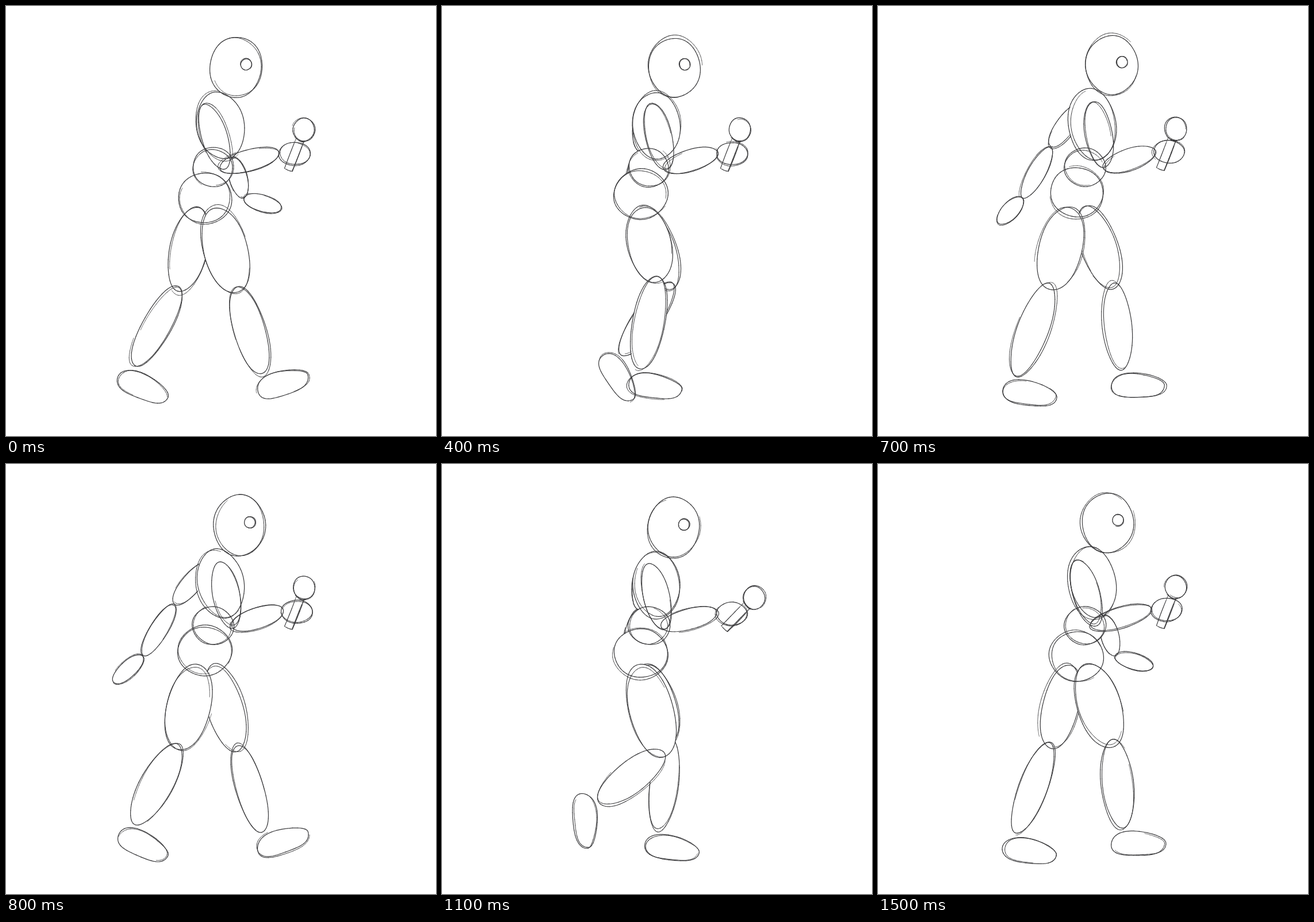
Recreate the animation shown at these times as an HTML page with a canvas. Size 748 px wide and 748 px high, loop 1600 ms.

```html
<!DOCTYPE html>
<html lang="en">
<head>
<meta charset="utf-8">
<title>Walk cycle sketch</title>
<style>
  html, body { margin: 0; width: 100%; height: 100%; overflow: hidden; background: #fff; }
  canvas { display: block; width: 748px; height: 748px; }
</style>
</head>
<body>
<canvas id="stage" width="748" height="748"></canvas>
<script>
const ctx = document.getElementById('stage').getContext('2d');
const STEP = 100, STEPS = 16, TAU = Math.PI * 2;

// One stride, evenly spaced from heel contact. The far leg runs half a stride later.
const KNEE = [[402, 497], [411, 494], [374, 478], [314, 490], [301, 495], [366, 522], [400, 490], [415, 480]];
const ANKLE = [[446, 640], [403, 645], [345, 632], [268, 651], [223, 627], [240, 580], [313, 607], [388, 625]];
const FOOT_TILT = [-20, 6, 5, 2, 22, 98, 55, 25];
const ARM_SWING = [0.95, 0.5, 0, -0.55, -1, -0.3, 0.2, 0.8];

// Smooth closed path through evenly spaced values.
function along(keys, step) {
  const n = keys.length, f = step / STEPS * n, i = Math.floor(f), u = f - i;
  const [a, b, c, d] = [-1, 0, 1, 2].map(k => keys[(i + k + n) % n]);
  return b + u / 2 * (c - a + u * (2 * a - 5 * b + 4 * c - d + u * (3 * (b - c) + d - a)));
}
const pathAt = (keys, step) => [0, 1].map(c => along(keys.map(k => k[c]), step));

function random(seed) {
  let s = Math.imul(seed, 2654435761);
  return () => {
    s = (s + 0x6D2B79F5) | 0;
    let t = Math.imul(s ^ (s >>> 15), s | 1);
    t ^= t + Math.imul(t ^ (t >>> 7), t | 61);
    return ((t ^ (t >>> 14)) >>> 0) / 4294967296;
  };
}

// A shape is a centre, a size and a function from turns to a point.
function oval(cx, cy, long, wide, angle = 0, profile = () => 1) {
  const c = Math.cos(angle), s = Math.sin(angle);
  const at = turn => {
    const x = Math.cos(turn * TAU), y = Math.sin(turn * TAU);
    const px = x * long / 2, py = y * wide / 2 * profile(x, y);
    return [cx + px * c - py * s, cy + px * s + py * c];
  };
  return { at, cx, cy, size: Math.min(long, wide) };
}

const limb = ([x1, y1], [x2, y2], wide) =>
  oval((x1 + x2) / 2, (y1 + y2) / 2, Math.hypot(x2 - x1, y2 - y1), wide, Math.atan2(y2 - y1, x2 - x1));

// Flat sole, and an upper that slopes down to the toe.
function footAt([x, y], degrees) {
  const a = degrees * Math.PI / 180, c = Math.cos(a), s = Math.sin(a);
  const profile = (px, py) => py < 0 ? 1.05 - 0.3 * px : 0.95 + 0.3 * px * px;
  return oval(x + 28 * (c - s), y + 28 * (c + s), 94, 42, a, profile);
}

function legAt(step, far) {
  const phase = (step + far * STEPS / 2) % STEPS;
  const hip = [348 + 14 * Math.cos(phase / STEPS * TAU), 349];
  const [kx, ky] = pathAt(KNEE, phase), ankle = pathAt(ANKLE, phase);
  return {
    thigh: limb(hip, [kx, ky + 3], far ? 64 : 76),
    shin: limb([kx, ky - 8], ankle, far ? 49 : 56),
    foot: footAt(ankle, along(FOOT_TILT, phase))
  };
}

function poseAt(step) {
  const bob = Math.sin(step / STEPS * TAU * 2);
  const sway = -Math.cos((step + 1) / STEPS * TAU);
  const lean = 12 + 9 * Math.cos(step / STEPS * TAU * 2);
  const near = legAt(step, 0), far = legAt(step, 1);

  const headX = 403 + 3.5 * sway, headY = 106.5 + 5.5 * bob;
  const wrist = [479 + 4 * sway, 254 + 4 * bob];

  const swing = along(ARM_SWING, step);
  const farElbow = [345 + 52 * swing, 254 + 10 * swing];
  const farWrist = [328 + 90 * swing, 334];

  // The microphone tips forward once per loop.
  const tilt = 0.37 + 0.4 * Math.exp(-(((step - 11) / 1.5) ** 2));
  const base = [491, 285 + 2 * bob];
  const mic = d => [base[0] + d * Math.sin(tilt), base[1] - d * Math.cos(tilt)];

  return {
    farUpper: limb([352, 172], farElbow, 34),
    farFore: limb(farElbow, farWrist, 31),
    farHand: limb(farWrist, [337 + 150 * swing, 366 - 14 * swing], 29),
    farThigh: far.thigh, farShin: far.shin, farFoot: far.foot,
    pelvis: oval(346, 329.5 - 5 * sway, 93, 87),
    belly: limb([325, 277], [395, 285], 66),
    torso: limb([373 - lean / 2, 149 + 6 * bob], [373 + lean / 2, 267], 82),
    head: oval(headX, headY, 90, 105),
    eye: oval(headX + 18, headY - 5, 19, 20),
    thigh: near.thigh, shin: near.shin, foot: near.foot,
    upperArm: limb([359 + 14 * sway, 170 + 5 * bob], [387 + 8 * sway, 284 + 4 * bob], 46),
    foreArm: limb([381 + 11 * sway, 283], wrist, 37),
    hand: oval(504 + 2 * sway, 257 + 5 * bob, 54, 40),
    ball: oval(...mic(75), 38, 40),
    handle: { base, neck: mic(57) }
  };
}

// Pencil stroke that thins towards its ends.
function stroke(pts) {
  const last = pts.length - 1;
  for (let i = 0; i < last; i += 2) {
    ctx.lineWidth = 0.55 + 0.65 * Math.sqrt(Math.sin(Math.PI * (i + 1) / (last + 2)));
    ctx.beginPath();
    pts.slice(i, i + 3).forEach(p => ctx.lineTo(...p));
    ctx.stroke();
  }
}

// Goes round a shape almost twice, drifting like a loose hand.
function sketch({ at, cx, cy, size }, rnd) {
  const turns = 1.6 + rnd() * 0.4, start = rnd(), heading = rnd() * TAU;
  const drift = Math.min(3.2, size * 0.05);
  const dx = Math.cos(heading) * drift, dy = Math.sin(heading) * drift;
  const grow = (rnd() - 0.5) * 0.08, p2 = rnd() * TAU, p3 = rnd() * TAU;
  const count = Math.round(60 + size), pts = [];
  for (let i = 0; i <= count; i++) {
    const u = i / count, d = u * 2 - 1, turn = start + u * turns;
    const k = 1 + grow * d + 0.013 * Math.sin(2 * TAU * turn + p2) + 0.011 * Math.sin(4.3 * TAU * turn + p3);
    const [x, y] = at(turn);
    pts.push([cx + (x - cx) * k + dx * d, cy + (y - cy) * k + dy * d]);
  }
  stroke(pts);
}

function mask({ at }) {
  ctx.beginPath();
  for (let i = 0; i < 64; i++) ctx.lineTo(...at(i / 64));
  ctx.fill();
}

function line([x1, y1], [x2, y2], bow) {
  const pts = [];
  for (let i = 0; i <= 10; i++) {
    const u = i / 10, b = Math.sin(Math.PI * u) * bow;
    pts.push([x1 + (x2 - x1) * u + b * 0.4, y1 + (y2 - y1) * u + b]);
  }
  stroke(pts);
}

function drawHandle({ base, neck }, rnd) {
  const len = Math.hypot(base[0] - neck[0], base[1] - neck[1]);
  const nx = (base[1] - neck[1]) / len * 7, ny = (neck[0] - base[0]) / len * 7;
  const side = ([x, y], k) => [x + nx * k, y + ny * k];
  const bow = () => (rnd() - 0.5) * 2;
  for (const k of [-1, 1, 1.1]) line(side(neck, k), side(base, k), bow());
  line(side(base, -1), side(base, 1), 1);
  line(side(neck, -1.4), side(neck, 1.4), 4);
}

function draw(step) {
  const pose = poseAt(step), names = Object.keys(pose);
  const rnd = name => random(step * 31 + names.indexOf(name) + 7);
  const pen = list => list.split(' ').forEach(n => sketch(pose[n], rnd(n)));
  const hide = list => list.split(' ').forEach(n => mask(pose[n]));

  ctx.fillStyle = '#fff';
  ctx.strokeStyle = '#39393b';
  ctx.lineCap = ctx.lineJoin = 'round';
  ctx.fillRect(0, 0, 748, 748);

  pen('farUpper farFore farHand');
  hide('torso belly pelvis');
  pen('farThigh farShin farFoot');
  hide('thigh shin');
  pen('pelvis belly torso head eye thigh shin foot upperArm foreArm hand ball');
  drawHandle(pose.handle, rnd('handle'));
}

const t0 = performance.now();
let shown = -1;
function tick() {
  const step = Math.floor((performance.now() - t0) / STEP) % STEPS;
  if (step !== shown) draw(shown = step);
  requestAnimationFrame(tick);
}
tick();
</script>
</body>
</html>
```
